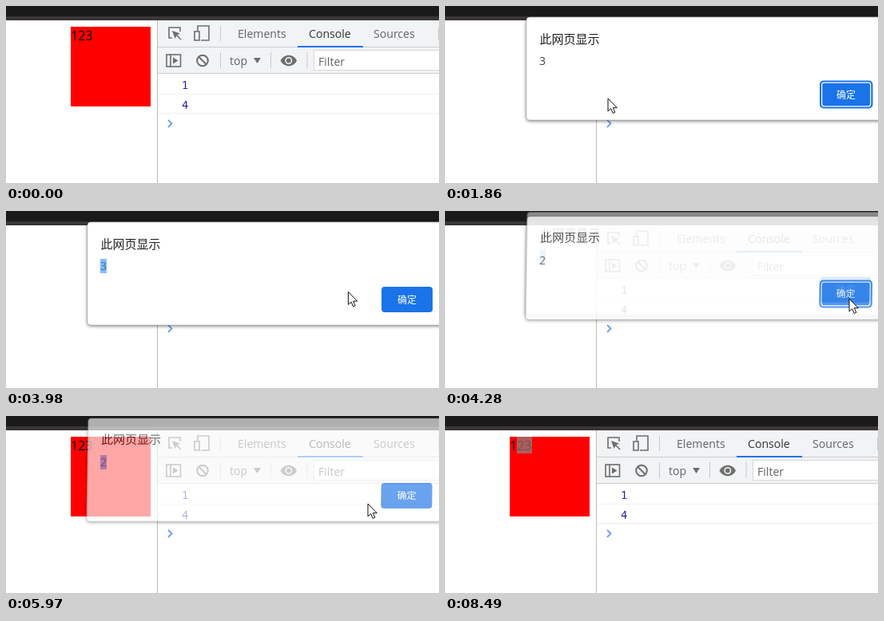
Animation of 542x222 px, one loop 8.59 s. Source, as an HTML page:

```html
<!DOCTYPE html>
<html lang="zh">
<head>
<meta charset="utf-8">
<title>Alert and console</title>
<style>
  html, body { margin: 0; width: 100%; height: 100%; overflow: hidden; background: #fff; }
  svg { display: block; width: 100%; height: 100%; }
  text { font: 14.1px "Open Sans", "Noto Sans", sans-serif; fill: #5f6368; white-space: pre; }
  .page { font-size: 16px; fill: #000; }
  .log { font: 14px "Noto Sans Mono", monospace; fill: #1a1aa6; }
  .title { font: 15px "Noto Sans CJK SC", "Noto Sans CJK", sans-serif; fill: #202124; }
  .ok { font: 500 12px "Noto Sans CJK SC", "Noto Sans CJK", sans-serif; fill: #fff; }
  .message { font-size: 14px; fill: #3c4043; }
  .icon { fill: none; stroke: #6e6e6e; stroke-width: 1.6; }
  .solid { fill: #6e6e6e; }
  .panel { filter: drop-shadow(0 1px 2px rgba(0, 0, 0, .55)); }
  .selection { fill: rgba(51, 144, 255, .6); }
</style>
</head>
<body>
<svg viewBox="0 0 542 222" preserveAspectRatio="none">
  <rect width="542" height="222" fill="#fff"/>
  <rect width="542" height="13" fill="#1a1a1a"/>
  <rect y="13" width="542" height="5" fill="#3a3536"/>

  <g id="box">
    <rect x="81" y="26" width="100" height="100" fill="#f00"/>
    <text class="page" x="81" y="43">123</text>
    <rect id="boxSelection" x="90" y="26" width="19" height="21"/>
  </g>

  <g id="devtools">
    <rect x="190" y="18" width="352" height="66" fill="#f1f3f4"/>
    <path d="M190 51.5H542M190 84.5H542" stroke="#cbcdd1"/>
    <path d="M190 110.5H542M190 134.5H542" stroke="#f0f0f0"/>
    <path d="M189.5 18V222" stroke="#bcbcbc"/>
    <path d="M268.5 25V44M541.5 27V43M268.5 58V78M331.5 58V78M377 58V78" stroke="#c8cacd"/>
    <rect x="365" y="50" width="82" height="2" fill="#1a73e8"/>
    <rect x="385.5" y="55.5" width="170" height="25" fill="#fff" stroke="#d4d6d9"/>

    <g class="icon">
      <path d="M218 32V27H204V40H208"/>
      <path d="M211 34L219 42"/>
      <path class="solid" stroke="none" d="M208 31L218 34.5L214 36.5L211.5 41Z"/>
      <path d="M240 31V25H254V43H244"/>
      <rect x="236" y="32" width="6" height="11"/>
      <rect x="201" y="61" width="17.500" height="15"/>
      <path d="M206 61V76"/>
      <path class="solid" stroke="none" d="M209 64.500L215.500 68.500L209 72.500Z"/>
      <g stroke-width="2"><circle cx="246" cy="68.500" r="6.800"/><path d="M241.500 64L250.500 73"/></g>
      <path class="solid" stroke="none" d="M310 65H319L314.500 72Z"/>
      <path class="solid" stroke="none" d="M343.500 68.500C348 59.500 360 59.500 364 68.500C360 77.500 348 77.500 343.500 68.500Z"/>
      <circle cx="353.800" cy="68.500" r="3.700" stroke="#f1f3f4"/>
    </g>

    <text x="290" y="40">Elements</text>
    <text x="379" y="40" style="fill:#333">Console</text>
    <text x="460" y="40">Sources</text>
    <text x="280" y="74">top</text>
    <text x="391" y="75">Filter</text>
    <text class="log" x="220" y="104">1</text>
    <text class="log" x="220" y="129">4</text>
    <path d="M203 143L207.500 147.500L203 152" fill="none" stroke="#6a9df0" stroke-width="1.800"/>
  </g>

  <g id="dialogs"></g>

  <g id="arrow">
    <path d="M0 0V16L3.700 12.700L6.200 18.500L8.800 17.300L6.300 11.700H11.300Z" fill="#fff" stroke="#111"/>
  </g>
  <g id="beam" fill="none">
    <path id="beamStem" d="M0 -7V7M-3.500 7.500H-1L0 6.500L1 7.500H3.500" stroke-width="1.300"/>
    <path d="M-3.500 -7.500H-1L0 -6.500L1 -7.500H3.500" stroke="#111" stroke-width="1.300"/>
  </g>
</svg>

<script>
const LOOP = 8590, TICK = 140;
const $ = id => document.getElementById(id);
const show = (el, on) => el.setAttribute("visibility", on ? "visible" : "hidden");

// Each alert: when its button loses focus, when its text is selected,
// and poses [time, lift, opacity] held until the next one.
const alerts = [
  { message: "3", blur: 2700, select: 2840,
    poses: [[740, 1.5, 1], [890, 0, 1], [4280, 12.5, .5], [4430, 0, 0]] },
  { message: "2", blur: 5120, select: 5260,
    poses: [[4280, 7, .75], [4430, 1.5, 1], [4550, 0, 1], [5970, 11, .65], [6120, 0, 0]] }
];

// Pointer strokes: start time, number of ticks, end point.
const strokes = [
  [1730, 1, 204, 116], [1870, 2, 118, 54], [2280, 4, 127, 67], [2840, 2, 118, 67],
  [3550, 5, 506, 110], [4700, 4, 126, 69], [5260, 1, 89, 68], [5400, 3, 453, 110],
  [6105, 6, 93.5, 29.5], [7100, 3, 156, 106], [7680, 3, 318, 127]
];

for (const alert of alerts) {
  alert.el = document.createElementNS("http://www.w3.org/2000/svg", "g");
  alert.el.innerHTML = `
    <rect class="panel" x="102" y="14" width="480" height="129" rx="4" fill="#fff"
      stroke="#b5b5b5" stroke-width=".6"/>
    <text class="title" x="118.500" y="46.500">此网页显示</text>
    <text class="message" x="118" y="74">${alert.message}</text>
    <rect class="selection" x="118" y="60" width="8" height="18"/>
    <rect x="470" y="95" width="64" height="32" rx="4" fill="#1a73e8"/>
    <g class="ring" fill="none">
      <rect x="470" y="94.500" width="64.500" height="33" rx="4" stroke="#1a73e8" stroke-width="2"/>
      <rect x="471.700" y="96.200" width="61" height="29.600" rx="3" stroke="#fff" stroke-width="1.200"/>
    </g>
    <text class="ok" x="490" y="115.500">确定</text>`;
  alert.ring = alert.el.querySelector(".ring");
  alert.selection = alert.el.querySelector(".selection");
  $("dialogs").append(alert.el);
}

function drawAlert(alert, t) {
  const [, lift, opacity] = alert.poses.findLast(p => p[0] <= t) || [0, 0, 0];
  const lean = lift > 5 ? .015 : 0;
  alert.el.setAttribute("opacity", opacity);
  alert.el.setAttribute("transform", `matrix(1 0 ${-lean} 1 ${lean * 75} ${-lift})`);
  alert.ring.setAttribute("opacity", t < alert.blur ? 1 : 0);
  alert.selection.setAttribute("opacity", t < alert.select ? 0 : 1);
}

function drawPointer(t) {
  const i = strokes.findLastIndex(s => s[0] <= t);
  const visible = i >= 0 && t < 8080;
  show($("arrow"), false);
  show($("beam"), false);
  if (!visible) return;
  const [start, ticks, endX, endY] = strokes[i];
  const [, , fromX, fromY] = strokes[Math.max(0, i - 1)];
  const part = Math.min(1, (Math.floor((t - start) / TICK) + 1) / ticks);
  const x = fromX + (endX - fromX) * part;
  const y = fromY + (endY - fromY) * part;
  const dragging = t >= 7100 && t < 7680;
  const pointer = dragging || (x < 135 && y < 80) ? $("beam") : $("arrow");
  pointer.setAttribute("transform", `translate(${x} ${y})`);
  $("beamStem").setAttribute("stroke", t >= 5970 ? "#fcd0d0" : "#111");
  show(pointer, true);
}

function draw(t) {
  show($("box"), t < 740 || t >= 5970);
  $("boxSelection").setAttribute("fill",
    t < 7100 ? "none" : t < 8490 ? "rgba(51,144,255,.6)" : "rgba(140,140,140,.65)");
  alerts.forEach(alert => drawAlert(alert, t));
  drawPointer(t);
}

const begin = performance.now();
function frame() {
  draw((performance.now() - begin) % LOOP);
  requestAnimationFrame(frame);
}
frame();
</script>
</body>
</html>
```
